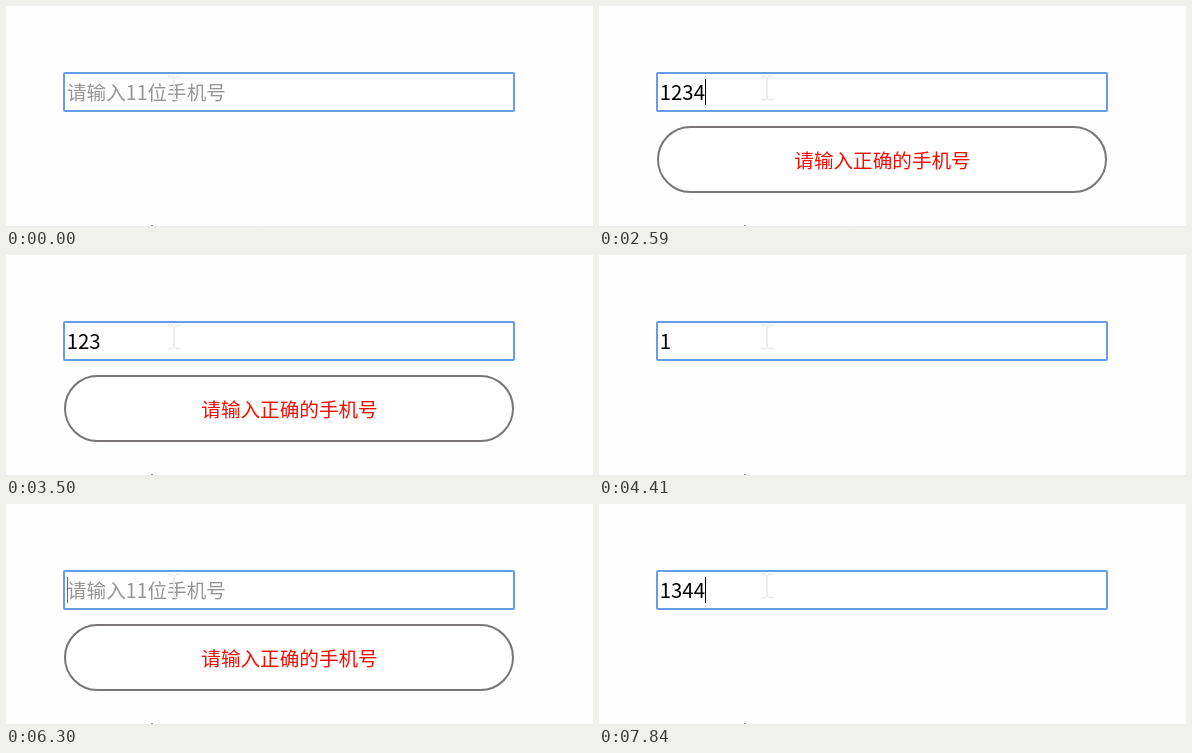
Animation, 587 px wide and 221 px high, one loop 8000 ms. Source, as an HTML page:

```html
<!DOCTYPE html>
<html lang="zh-CN">
<head>
<meta charset="utf-8">
<title>手机号输入框</title>
<style>
  html, body { margin: 0; width: 100%; height: 100%; overflow: hidden; background: #fefefe; }
  svg { display: block; width: 587px; height: 221px; }
  text { font: 19.6px "Noto Sans CJK SC", "Noto Sans CJK", "Noto Sans", sans-serif; white-space: pre; }
  #value { font-size: 20.4px; fill: #000; }
  #hint { fill: #959595; }
  #alert text { fill: #f80c00; text-anchor: middle; }
</style>
</head>
<body>
<svg viewBox="0 0 587 221">
  <rect x="58" y="67" width="450" height="38" rx="1" fill="#fff" stroke="#659cec" stroke-width="2"/>
  <text id="hint" x="61" y="94.2">请输入11位手机号</text>
  <text id="value" x="60.7" y="94"></text>
  <rect id="caret" y="73" width="1" height="26" shape-rendering="crispEdges"/>

  <g id="alert">
    <rect x="59" y="121" width="448" height="65" rx="32.5" fill="#fff" stroke="#7b7676" stroke-width="2"/>
    <text x="283.5" y="162.3">请输入正确的手机号</text>
  </g>

  <!-- mouse pointer -->
  <path d="M162 70.5h5m2 0h6M162 93.5h5m2 0h6M168 71v22" fill="none" stroke="#e9e9e9" stroke-width="1.6"/>

  <!-- lower page edge -->
  <path d="M0 220.5h587" stroke="#ececec"/>
  <rect x="145" y="219" width="2" height="1" fill="#999"/>
</svg>
<script>
  const LOOP = 8000;

  // Each track lists [start ms, state].
  const typed = [
    [0, ""], [770, "1"], [1890, "12"], [2170, "123"], [2590, "1234"],
    [3360, "123"], [3640, "12"], [3920, "1"], [4480, ""],
    [5460, "1"], [6160, ""], [6650, "1"], [7070, "13"], [7560, "134"], [7840, "1344"]
  ];
  const caretOn = [
    [0, false], [70, true], [560, false], [770, true], [1190, false], [1680, true],
    [3010, false], [3570, true], [3920, false], [4060, true], [4410, false],
    [4620, true], [5110, false], [5460, true], [5880, false], [6300, true]
  ];
  const alertOn = [
    [0, false], [2170, true], [3080, false], [3500, true], [4410, false],
    [4620, true], [5600, false], [6300, true], [6440, false]
  ];
  const caretX = [61, 71, 83, 94, 106];

  const [hint, value, caret, alertBox] =
    ["hint", "value", "caret", "alert"].map(id => document.getElementById(id));

  const stateAt = (track, t) => track.findLast(([start]) => start <= t)[1];
  const show = (el, on) => el.setAttribute("visibility", on ? "visible" : "hidden");

  function draw(t) {
    const text = stateAt(typed, t);
    value.textContent = text;
    show(hint, !text);
    show(caret, stateAt(caretOn, t));
    caret.setAttribute("x", caretX[text.length]);
    caret.setAttribute("fill", text ? "#000" : "#666");
    show(alertBox, stateAt(alertOn, t));
  }

  const begin = performance.now();
  function tick() {
    draw((performance.now() - begin) % LOOP);
    requestAnimationFrame(tick);
  }
  draw(0);
  requestAnimationFrame(tick);
</script>
</body>
</html>
```
